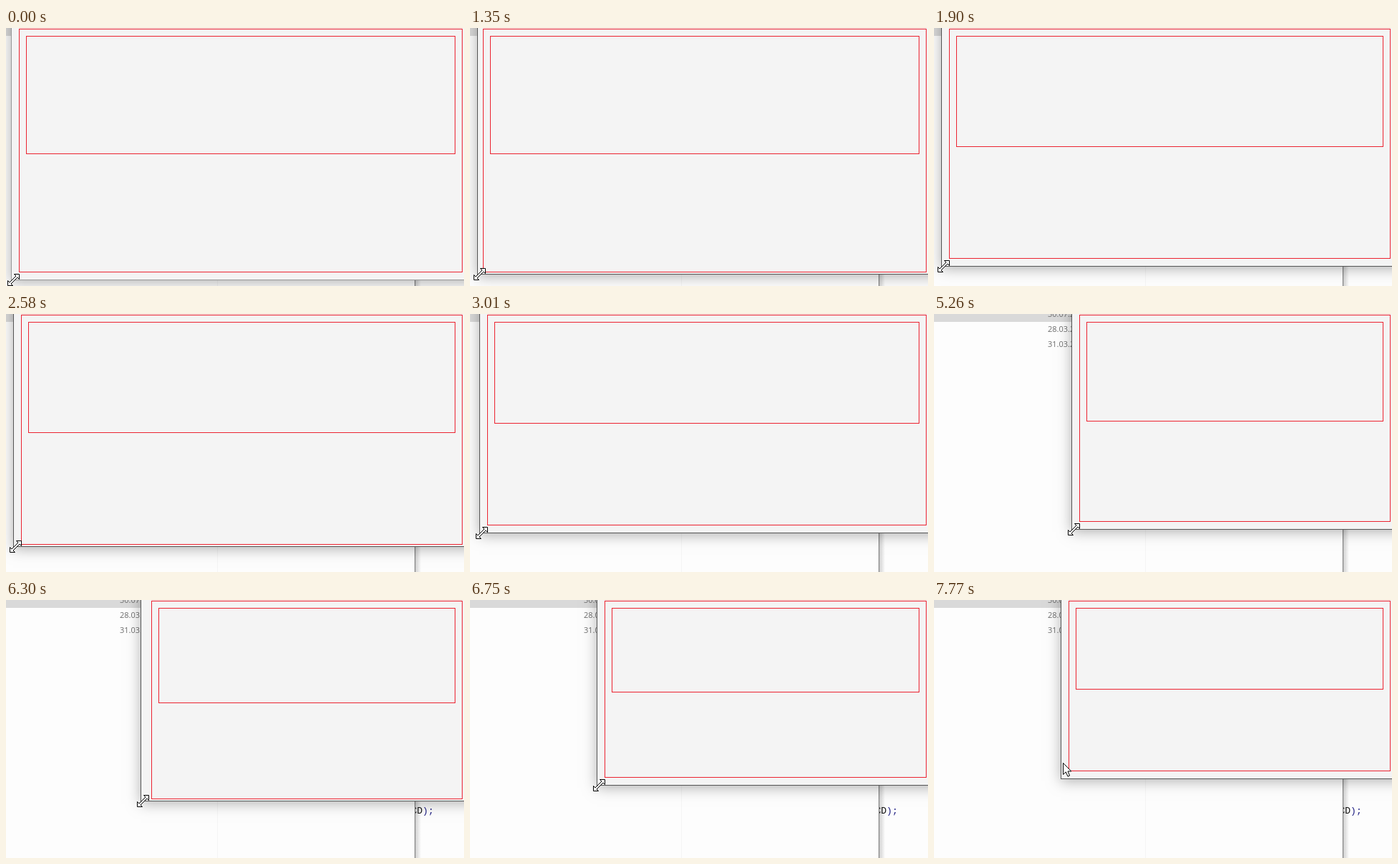
Recreate the animation shown at these times as an HTML page with a canvas. Size 640x360 px, loop 8000 ms.

```html
<!DOCTYPE html>
<html lang="en">
<head>
<meta charset="utf-8">
<title>Window resize</title>
<style>
  html, body { margin: 0; width: 100%; height: 100%; overflow: hidden; background: #fdfdfd; }
  canvas { display: block; }
</style>
</head>
<body>
<canvas id="stage" width="640" height="360"></canvas>
<script>
const ctx = document.getElementById('stage').getContext('2d');
const LOOP = 8000, ARROW_TIME = 7620;
const RED = '#ec2330';

// Each drag moves the window's lower left corner in a few visible moves.
// The panels keep their old layout until the drag settles.
const drags = [
  { start: 0, moves: 1, settle: 0, left: 7, bottom: 351 },
  { start: 1350, moves: 1, settle: Infinity, left: 10, bottom: 343 },
  { start: 1500, moves: 1, settle: 1900, left: 10, bottom: 332 },
  { start: 2580, moves: 1, settle: Infinity, left: 10, bottom: 324 },
  { start: 2730, moves: 2, settle: 3010, left: 13, bottom: 305 },
  { start: 3590, moves: 3, settle: 3950, left: 125, bottom: 295 },
  { start: 4840, moves: 3, settle: 5260, left: 192, bottom: 300 },
  { start: 6150, moves: 1, settle: 6150, left: 192, bottom: 288 },
  { start: 6300, moves: 3, settle: 6750, left: 177, bottom: 258 },
  { start: 7500, moves: 1, settle: 7620, left: 177, bottom: 249 }
];

const resizeCursor = new Path2D('M9.5.5H16.5V7.5L14 5 5 14 7.5 16.5H.5V9.5L3 12 12 3Z');
const arrowCursor = new Path2D('M.5.5V16.5L4.3 13 7 19.2 9.6 18 7 12H11.8Z');

function cornerAt(t) {
  const i = drags.findLastIndex(d => d.start <= t);
  const to = drags[i], from = drags[i - 1] || to;
  const moveTime = (to.settle - to.start) / to.moves || 1;
  const p = Math.min(1, (1 + Math.floor((t - to.start) / moveTime)) / to.moves);
  const ease = p * p * (3 - 2 * p);
  const mix = key => Math.round(from[key] + (to[key] - from[key]) * ease);
  return { left: mix('left'), bottom: mix('bottom') };
}

function rect(color, x, y, w, h) {
  ctx.fillStyle = color;
  ctx.fillRect(x, y, w, h);
}

function text(str, x, y, font, color) {
  ctx.font = font;
  ctx.fillStyle = color;
  ctx.fillText(str, x, y);
}

function clipped(x, y, w, h, paint) {
  ctx.save();
  ctx.beginPath();
  ctx.rect(x, y, w, h);
  ctx.clip();
  paint();
  ctx.restore();
}

function desktop() {
  rect('#fdfdfd', 0, 0, 640, 360);
  rect('#d9d9d9', 0, 0, 571, 11);
  rect('#f4f4f4', 295, 11, 1, 349);
  ['30.07.2017', '28.03.2017', '31.03.2017'].forEach((date, i) =>
    text(date, 159, 4 + 21 * i, '11px "Open Sans", sans-serif', '#6d6d6d'));

  const shade = ctx.createLinearGradient(572, 0, 580, 0);
  shade.addColorStop(0, '#cfcfcf');
  shade.addColorStop(1, '#fdfdfd');
  rect(shade, 572, 0, 8, 360);
  rect('#777', 571, 0, 1, 360);
  clipped(572, 280, 68, 30, () => {
    const mono = '13px "Liberation Mono", monospace';
    text('CD', 566.5, 298, mono, '#111');
    text(');', 582.1, 298, mono, '#1a1a80');
  });
}

function panel(x, y, right, bottom) {
  ctx.strokeStyle = RED;
  ctx.strokeRect(x + .5, y + .5, right - x, bottom - y);
}

function frame({ left, bottom }, layout, border) {
  ctx.save();
  ctx.shadowColor = 'rgba(0,0,0,.3)';
  ctx.shadowBlur = 18;
  ctx.shadowOffsetY = 3;
  rect(border, left, -40, 720, bottom + 41);
  ctx.restore();
  rect('#f4f4f4', left + 1, 0, 640, bottom);

  const x = layout.left + 11, y = layout.bottom - 11;
  clipped(left + 1, 0, 640, bottom, () => {
    panel(x, 1, 637, y);
    panel(x + 10, 11, 627, Math.floor(y / 2) + 5);
  });
}

function cursor(path, x, y) {
  ctx.save();
  ctx.translate(x, y);
  ctx.fillStyle = '#fff';
  ctx.strokeStyle = '#000';
  ctx.fill(path);
  ctx.stroke(path);
  ctx.restore();
}

function draw(t) {
  const corner = cornerAt(t);
  const layout = drags.findLast(d => d.settle <= t);
  desktop();
  frame(corner, layout, t < 540 ? '#999' : '#555');
  if (t < ARROW_TIME) cursor(resizeCursor, corner.left - 5, corner.bottom - 8);
  else cursor(arrowCursor, corner.left + 3, corner.bottom - (t < ARROW_TIME + 150 ? 16 : 22));
}

const start = performance.now();
function tick() {
  draw((performance.now() - start) % LOOP);
  requestAnimationFrame(tick);
}
tick();
</script>
</body>
</html>
```
